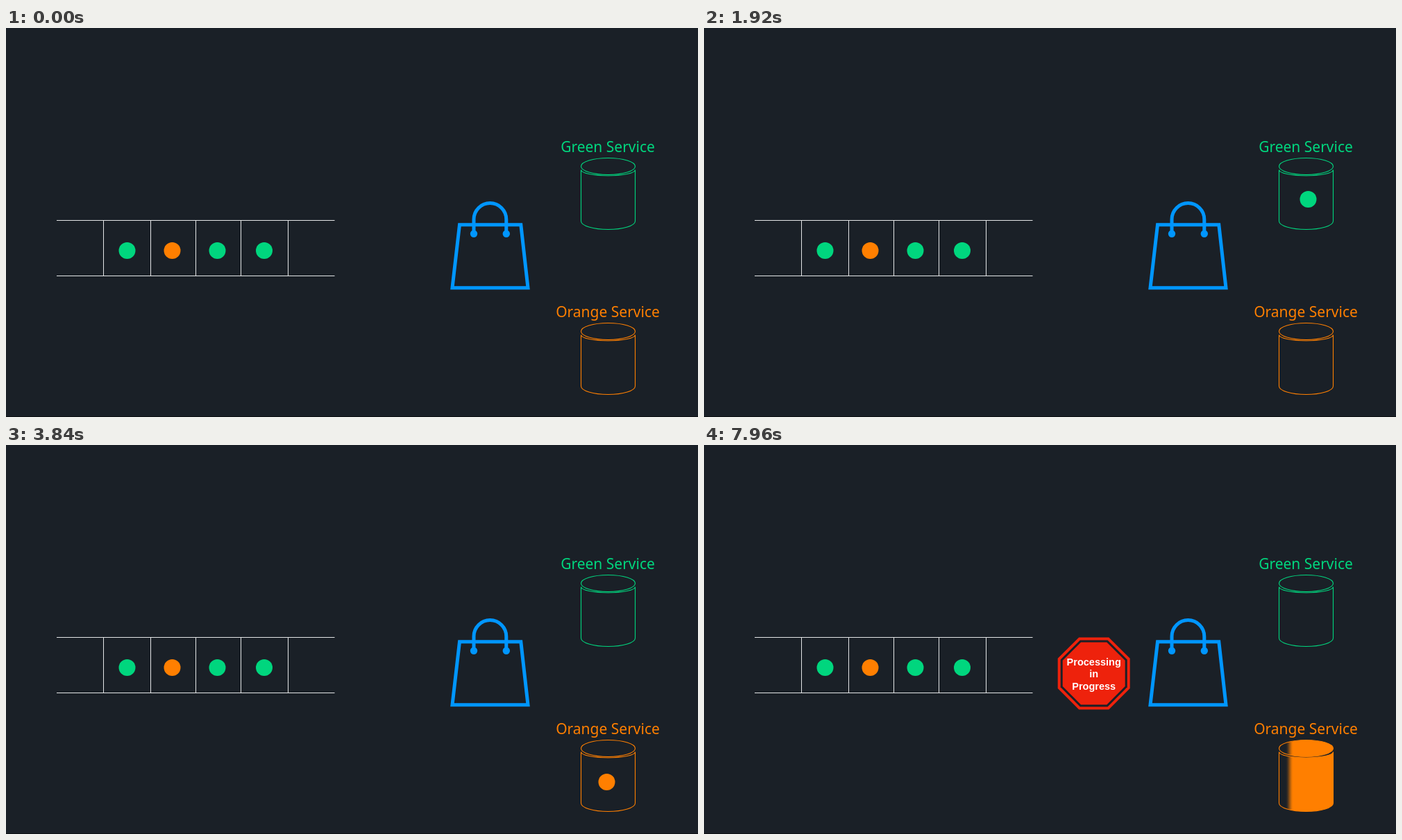
An HTML page with a canvas for the animation above (8 s loop, 997 by 561 pixels).

```html
<!DOCTYPE html>
<html lang="en">
<head>
<meta charset="utf-8">
<title>Queue and services</title>
<style>
  html, body { margin: 0; width: 100%; height: 100%; overflow: hidden; background: #1a2027; }
  canvas { display: block; width: 997px; height: 561px; }
</style>
</head>
<body>
<canvas id="stage" width="997" height="561"></canvas>
<script>
const ctx = document.getElementById('stage').getContext('2d');
const LOOP = 8000, TICK = 40;
const BG = '#1a2027', GREEN = '#00d67e', ORANGE = '#ff7f00', BLUE = '#0096ff', RED = '#ee220c';

const clamp = v => Math.max(0, Math.min(1, v));
const span = (t, a, b) => clamp((t - a) / (b - a));
const ease = p => p * p * (3 - 2 * p);
const pulse = (t, a, b) => Math.sin(Math.PI * span(t, a, b)) ** 2;

function disc(x, y, r, color) {
  ctx.fillStyle = color;
  ctx.beginPath();
  ctx.arc(x, y, r, 0, Math.PI * 2);
  ctx.fill();
}

function poly(points) {
  ctx.beginPath();
  points.forEach(([x, y]) => ctx.lineTo(x, y));
  ctx.closePath();
}

function label(text, x, y, font, color) {
  ctx.font = font;
  ctx.fillStyle = color;
  ctx.textAlign = 'center';
  ctx.fillText(text, x, y);
}

function faded(alpha, draw) {
  if (alpha <= 0) return;
  ctx.save();
  ctx.globalAlpha = alpha;
  draw();
  ctx.restore();
}

function queue() {
  ctx.strokeStyle = '#e4e6e7';
  ctx.lineWidth = 1;
  ctx.beginPath();
  for (const y of [277.5, 357.5]) {
    ctx.moveTo(73, y);
    ctx.lineTo(473.5, y);
  }
  for (const x of [140.5, 208.5, 273.5, 338.5, 406.5]) {
    ctx.moveTo(x, 277.5);
    ctx.lineTo(x, 357.5);
  }
  ctx.stroke();
  [174.5, 239.5, 304.5, 372].forEach((x, i) => disc(x, 321, 12, i === 1 ? ORANGE : GREEN));
}

function bag() {
  ctx.strokeStyle = BLUE;
  ctx.lineWidth = 5;
  poly([[653.5, 283.7], [741.8, 283.7], [752, 374.8], [643, 374.8]]);
  ctx.stroke();
  ctx.beginPath();
  ctx.moveTo(674, 297);
  ctx.arc(697.4, 276, 23.4, Math.PI, 0);
  ctx.lineTo(720.8, 297);
  ctx.stroke();
  disc(674, 296.8, 5.2, BLUE);
  disc(720.8, 296.8, 5.2, BLUE);
}

function bagFill(color, alpha) {
  faded(alpha, () => {
    ctx.fillStyle = color;
    poly([[657.5, 288], [738, 288], [754, 373], [641, 373]]);
    ctx.fill();
  });
}

// Lid and body of a cylinder whose lid is centred at height y
function cylinder(y, paint) {
  const x = 867.5, r = 39;
  ctx.beginPath();
  ctx.ellipse(x, y, r, 12, 0, 0, Math.PI * 2);
  paint();
  ctx.beginPath();
  ctx.ellipse(x, y + 5, r, 8.5, 0, Math.PI, 0, true);
  ctx.lineTo(x + r, y + 79);
  ctx.ellipse(x, y + 79, r, 12, 0, 0, Math.PI);
  ctx.closePath();
  paint();
}

function service(name, y, color) {
  label(name, 867, y - 21, '500 21px "Noto Sans", "Open Sans", sans-serif', color);
  ctx.strokeStyle = color;
  ctx.lineWidth = 1.1;
  cylinder(y, () => ctx.stroke());
}

function serviceFill(y, style, alpha) {
  faded(alpha, () => {
    ctx.fillStyle = style;
    cylinder(y, () => ctx.fill());
  });
}

// Soft edge that slowly clears the fill from the left
function wipe(t) {
  const right = 829 + 5.2 * Math.max(0, t - 4120) / 1000, width = 11;
  const g = ctx.createLinearGradient(right - width, 0, right, 0);
  for (let i = 0; i <= 8; i++) g.addColorStop(i / 8, `rgba(255,127,0,${ease(i / 8)})`);
  return g;
}

function octagon(half) {
  const k = half * Math.SQRT2 * Math.sin(Math.PI / 8) / Math.cos(Math.PI / 8) / Math.SQRT2;
  poly([[-k, -half], [k, -half], [half, -k], [half, k], [k, half], [-k, half], [-half, k], [-half, -k]]
    .map(([x, y]) => [561.7 + x, 329.4 + y]));
}

function sign(alpha) {
  faded(alpha, () => {
    [[52, RED], [48, BG], [45, RED]].forEach(([half, color]) => {
      ctx.fillStyle = color;
      octagon(half);
      ctx.fill();
    });
    ['Processing', 'in', 'Progress'].forEach((word, i) =>
      label(word, 561.7, 317.5 + 17.6 * i, 'bold 14.5px "Liberation Sans", Arial, sans-serif', '#fff'));
  });
}

// A message goes from the queue to the bag, then on to its service
function message(t, m) {
  if (t < m.start || t >= m.end) return;
  const a = ease(span(t, m.start, m.start + 320));
  const b = ease(span(t, m.start + 840, m.start + 1160));
  const at = i => m.from[i] + (m.bag[i] - m.from[i]) * a + (m.to[i] - m.bag[i]) * b;
  disc(at(0), at(1), 12, m.color);
}

const messages = [
  { color: GREEN, start: 480, end: 2200, from: [174.5, 321], bag: [694, 322], to: [870.5, 247] },
  { color: ORANGE, start: 2680, end: 4160, from: [239.5, 321], bag: [694, 324.5], to: [865.5, 486] }
];

function draw(t) {
  ctx.fillStyle = BG;
  ctx.fillRect(0, 0, 997, 561);
  ctx.fillStyle = 'rgba(0,0,0,0.5)';
  ctx.fillRect(0, 560, 997, 1);

  queue();
  bag();
  service('Green Service', 199.5, GREEN);
  service('Orange Service', 437.5, ORANGE);

  for (const m of messages) bagFill(m.color, pulse(t, m.start + 320, m.start + 840));
  serviceFill(199.5, GREEN, pulse(t, 1640, 1920) + pulse(t, 1920, 2160));
  const busy = ease(span(t, 3840, 4120));
  serviceFill(437.5, wipe(t), busy);
  sign(busy);

  for (const m of messages) message(t, m);
}

const begin = performance.now();
function frame() {
  const t = (performance.now() - begin) % LOOP;
  draw(Math.floor(t / TICK) * TICK);
  requestAnimationFrame(frame);
}
frame();
</script>
</body>
</html>
```
